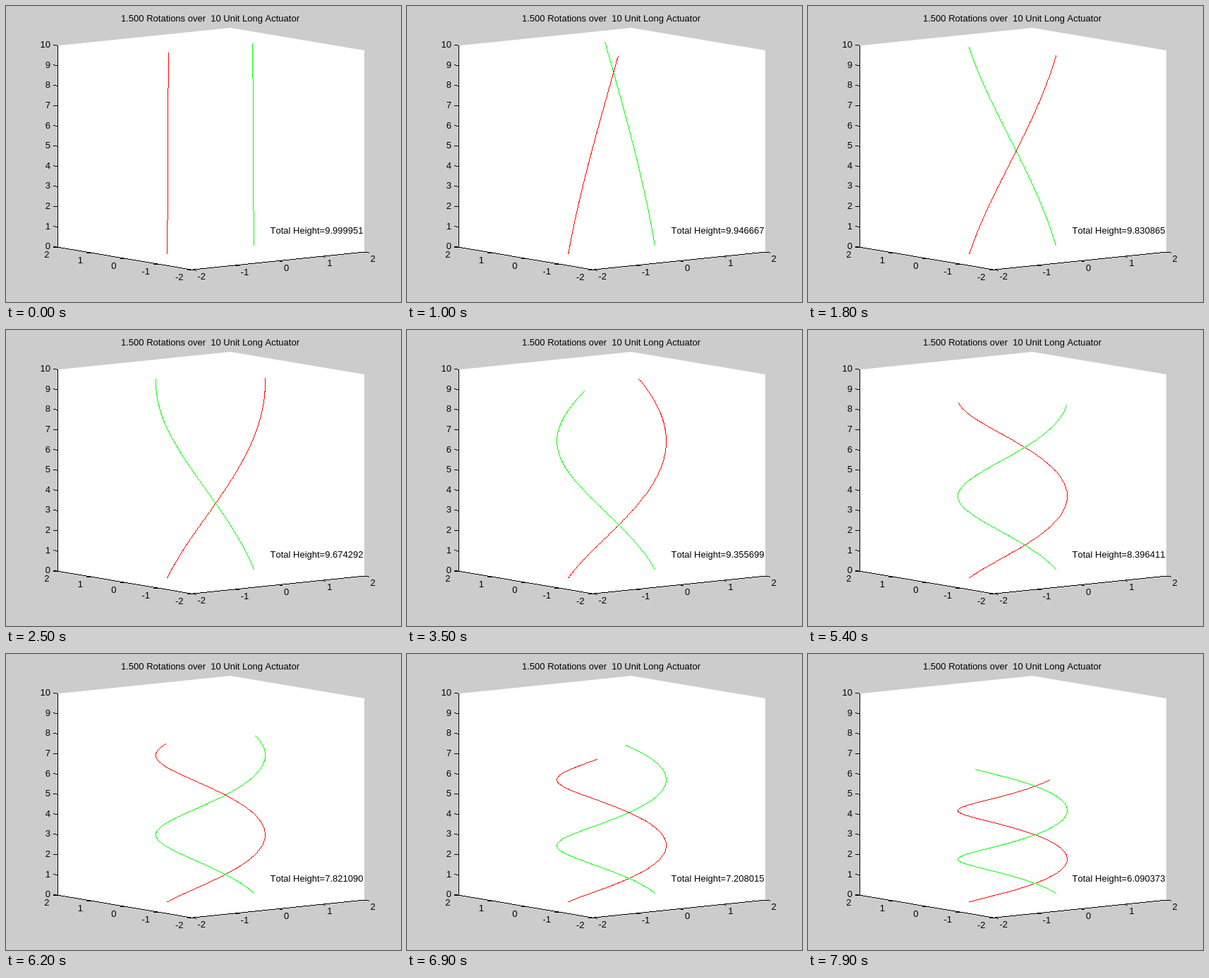
An HTML page with a canvas for the animation above (8 s loop, 560x420 px).

```html
<!DOCTYPE html>
<html>
<head>
<meta charset="utf-8">
<style>
html, body { margin: 0; width: 100%; height: 100%; overflow: hidden; background: #ccc; }
canvas { display: block; }
</style>
</head>
<body>
<canvas id="stage" width="560" height="420"></canvas>
<script>
const ctx = document.getElementById('stage').getContext('2d');
const LENGTH = 10, STEP_MS = 100, STEPS = 80;

// Orthographic projection of the plot box
const project = (x, y, z) => [
  290.5 + 61.25 * x - 47.5 * y,
  345.6 - 6.3 * x - 8 * y - 28.6 * z
];

// One-pixel line without smoothing
function line([x0, y0], [x1, y1], color) {
  const n = Math.max(1, Math.ceil(Math.max(Math.abs(x1 - x0), Math.abs(y1 - y0))));
  ctx.fillStyle = color;
  for (let i = 0; i <= n; i++) {
    const k = i / n;
    ctx.fillRect(Math.floor(x0 + (x1 - x0) * k), Math.floor(y0 + (y1 - y0) * k), 1, 1);
  }
}

function text(str, x, y, align) {
  ctx.fillStyle = '#000';
  ctx.textAlign = align;
  ctx.fillText(str, x, Math.round(y));
}

function tick([x, y], dx, dy) {
  line([x, y], [x + dx, y + dy], '#000');
}

function drawBox() {
  ctx.fillStyle = '#ccc';
  ctx.fillRect(0, 0, 560, 420);

  const left = project(-2, 2, 0), front = project(-2, -2, 0), right = project(2, -2, 0);
  const leftTop = project(-2, 2, 10);
  ctx.fillStyle = '#fff';
  ctx.beginPath();
  for (const p of [left, leftTop, project(2, 2, 10), project(2, -2, 10), right, front]) ctx.lineTo(...p);
  ctx.fill();

  line(left, leftTop, '#000');
  line(left, front, '#000');
  line(front, right, '#000');

  for (let z = 0; z <= 10; z++) {
    const p = project(-2, 2, z);
    tick(p, -6, -1);
    text(z, 63, p[1] + 3, 'right');
  }
  for (let v = -2; v <= 2; v++) {
    const a = project(-2, v, 0), b = project(v, -2, 0);
    tick(a, -6, 0.6);
    text(v, a[0] - 11.5, a[1] + 14.4, 'right');
    tick(b, 6, 1);
    text(v, b[0] + 8.5, b[1] + 14, 'left');
  }
  text('1.500 Rotations over  10 Unit Long Actuator', 289.5, 22, 'center');
}

function drawHelix(side, twist, height, color) {
  const point = s => {
    const a = twist * s;
    const [x, y] = project(side * Math.cos(a), side * Math.sin(a), height * s);
    return [x - 0.5, y];
  };
  const n = 100;
  for (let i = 0; i < n; i++) line(point(i / n), point((i + 1) / n), color);
}

function draw(now) {
  const step = Math.floor(now / STEP_MS) % STEPS;
  const twist = Math.PI / 100 + step * 0.1;
  const height = Math.sqrt(LENGTH ** 2 - twist ** 2);

  ctx.font = '13px Arial, "Liberation Sans", sans-serif';
  ctx.fontKerning = 'none';
  drawBox();
  drawHelix(-1, twist, height, '#f00');
  drawHelix(1, twist, height, '#0f0');
  text('Total Height=' + height.toFixed(6), 374.5, 323, 'left');
}

const start = performance.now();
function loop() {
  draw(performance.now() - start);
  requestAnimationFrame(loop);
}
loop();
</script>
</body>
</html>
```
